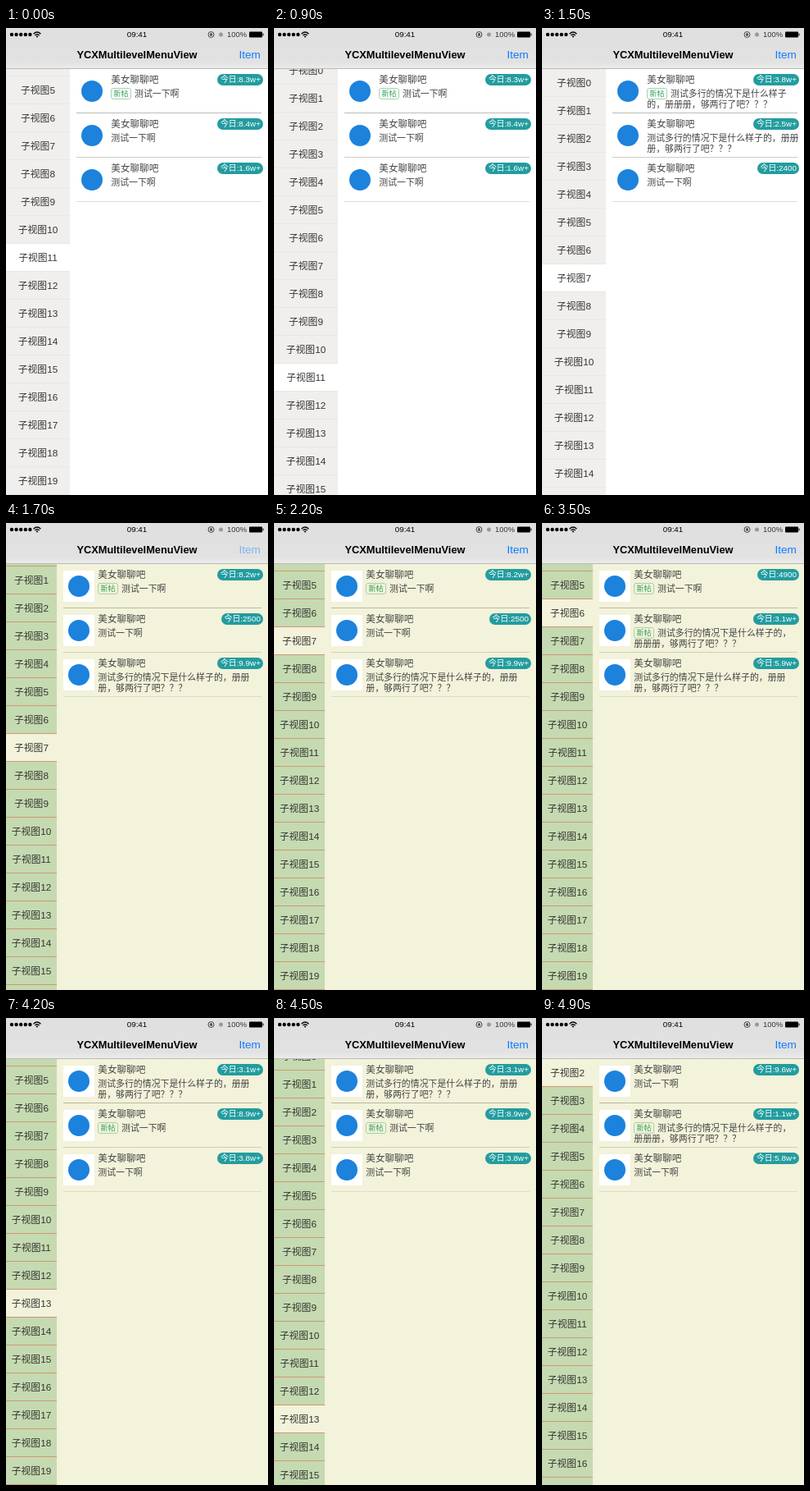
An HTML page for the animation above (5 s loop, 320 by 569 pixels).

```html
<!DOCTYPE html>
<html lang="zh-CN">
<head>
<meta charset="utf-8">
<title>YCXMultilevelMenuView</title>
<style>
html, body { margin: 0; width: 100%; height: 100%; overflow: hidden; }
body { position: relative; background: var(--page); color: #444; white-space: nowrap;
  font-family: "Liberation Sans", "Noto Sans CJK SC", "Noto Sans CJK", sans-serif;
  --page: #fff; --side: #f0efed; --rule: #e7e6e4; --left: 78px; }
body.green { --page: #f3f2da; --side: #c5dab0; --rule: #cf9878; --left: 62px; }
div, svg { position: absolute; }

#menu { left: 0; top: 50px; width: var(--left); }
#menu div { left: 0; width: 100%; height: 34px; box-sizing: border-box; background: var(--side);
  border-bottom: 1px solid var(--rule); font-size: 11.8px; line-height: 34px; text-align: center; color: #333; }
#menu div.on { background: var(--page); }

#cards { left: var(--left); top: 50px; right: 0; height: 170px; }
.card { left: 0; width: 100%; height: 54px; }
.card hr { position: absolute; left: 8px; right: 8px; top: 53px; height: 1px; margin: 0; border: 0; }
.icon { left: 8px; top: 8px; width: 38px; height: 38px; background: #fff; }
.icon::after { content: ""; position: absolute; left: 5.5px; top: 6px; width: 26px; height: 26px;
  border-radius: 50%; background: #1c82dc; }
.name { left: 50.3px; top: 6px; font-size: 11.6px; line-height: 14px; }
.text { left: 50.3px; top: 24px; font-size: 10.9px; line-height: 13px; }
.tag { left: 50px; top: 23px; width: 23px; height: 12px; border: 1px solid #a3d2ab; border-radius: 3px;
  font-size: 9px; line-height: 12.5px; text-align: center; color: #35a05c; }
.gap { display: inline-block; width: 28.7px; }
.badge { right: 6px; top: 6px; height: 14px; padding: 0 3px 0 3.8px; border-radius: 7px;
  background: #239c9f; color: #fff; font-size: 9.9px; line-height: 14px; }

#nav { left: 0; top: 0; width: 320px; height: 49px; border-bottom: 1px solid #b8b8b4;
  background: linear-gradient(#dfdfdf, #e2e2e2 85%, #ebebeb); color: #000; }
#nav div { line-height: 16px; }
#nav svg { left: 0; top: 0; }
#title { top: 25px; width: 100%; text-align: center; font-weight: bold; font-size: 12.8px; }
#item { left: 284.5px; top: 25px; font-size: 13.6px; color: #0a7aff; }
#clock { top: 0; width: 100%; text-align: center; font-size: 9.8px; }
#charge { left: 270px; top: 0; font-size: 9.4px; color: #333; }
</style>
</head>
<body>
<div id="menu"></div>
<div id="cards"></div>
<div id="nav">
  <svg width="320" height="18">
    <path d="M7 8H30" stroke="#000" stroke-width="4.4" stroke-linecap="round" stroke-dasharray="0 5.6"/>
    <g fill="none" stroke="#000" stroke-width="1.3">
      <path d="M33.6 7.2Q38 2.8 42.4 7.2M35.3 9.1Q38 6.4 40.7 9.1"/>
    </g>
    <path d="M36.6 10.2Q38 9 39.4 10.2L38 11.8Z"/>
    <circle cx="250.5" cy="8" r="3.5" fill="none" stroke="#444"/>
    <path d="M249 7.5h3v2h-3zM249.7 7.5v-1.4h1.6v1.4" fill="#444"/>
    <circle cx="262.5" cy="8" r="2.5" fill="#999"/>
    <rect x="297" y="4.5" width="16" height="7" rx="1"/>
    <rect x="313.5" y="6.5" width="1" height="3"/>
  </svg>
  <div id="clock">09:41</div>
  <div id="charge">100%</div>
  <div id="title">YCXMultilevelMenuView</div>
  <div id="item">Item</div>
</div>
<script>
const LOOP = 5000, STEP = 100, ROW = 34, ROWS = 20;
const $ = id => document.getElementById(id);
const SHORT = '测试一下啊';
const LONG = '测试多行的情况下是什么样子的，册册册，够两行了吧？？？';
const RULES = ['#bbb', '#ccc', '#ddd'], GREEN_RULES = ['#b9b8a4', '#cfceba', '#dddcc8'];

// Card: optional "t" for the tag, "l" for the long text, then the count.
const states = [
  { at: 0, row: 11, cards: ['t 8.3w+', ' 8.4w+', ' 1.6w+'] },
  { at: 1500, row: 7, cards: ['tl 3.8w+', 'l 2.5w+', ' 2400'] },
  { at: 1700, row: 7, green: true, cards: ['t 8.2w+', ' 2500', 'l 9.9w+'] },
  { at: 3000, row: 6, green: true, cards: ['t 4900', 'tl 3.1w+', 'l 5.9w+'] },
  { at: 4000, row: 13, green: true, cards: ['l 3.1w+', 't 8.9w+', ' 3.8w+'] },
  { at: 4700, row: 2, green: true, cards: [' 9.6w+', 'tl 1.1w+', ' 5.8w+'] }
];

const drag = p => 1 - (1 - p) ** 2;
const glide = p => p < .5 ? 2 * p * p : 1 - 2 * (1 - p) ** 2;
// Menu scrolling: start, end, target offset, easing.
const moves = [
  [0, 500, 60, drag], [600, 1200, 0, drag], [1600, 1920, 161, glide],
  [2300, 2800, 20, drag], [2900, 3220, 161, glide], [3500, 3900, 40, drag],
  [3900, 4200, 161, glide], [4200, 4500, 20, drag], [4600, 4900, 68, glide]
];

function offset(t) {
  let y = 161;
  for (const [start, end, to, ease] of moves) {
    if (t <= start) break;
    y += (to - y) * ease(Math.min(1, (t - start) / (end - start)));
  }
  return Math.round(y);
}

function cardHtml(spec, i, green) {
  const [kind, count] = spec.split(' ');
  const tag = kind.includes('t');
  const cut = tag ? (green ? 15 : 13) : 17;
  const text = kind.includes('l') ? LONG.slice(0, cut) + '<br>' + LONG.slice(cut) : SHORT;
  return `<div class="card" style="top:${i * 54}px"><div class="icon"></div>
    <div class="name">美女聊聊吧</div>${tag ? '<div class="tag">新帖</div>' : ''}
    <div class="text">${tag ? '<span class="gap"></span>' : ''}${text}</div>
    <div class="badge">今日:${count}</div>
    <hr style="background:${(green ? GREEN_RULES : RULES)[i]}"></div>`;
}

function show(state) {
  document.body.className = state.green ? 'green' : '';
  rows.forEach((r, i) => r.className = i === state.row ? 'on' : '');
  $('cards').innerHTML = state.cards.map((c, i) => cardHtml(c, i, state.green)).join('');
}

const rows = Array.from({ length: ROWS }, (_, i) => {
  const row = document.createElement('div');
  row.textContent = '子视图' + i;
  row.style.top = i * ROW + 'px';
  return $('menu').appendChild(row);
});

let current;
function draw(now) {
  const t = Math.floor(now % LOOP / STEP) * STEP;
  const state = states.findLast(s => s.at <= t);
  if (state !== current) show(current = state);
  $('menu').style.transform = `translateY(${-offset(t)}px)`;
  $('item').style.opacity = t < 1700 ? 1 : Math.min(1, .45 + (t - 1700) / 800);
}

const began = performance.now();
function tick() {
  draw(performance.now() - began);
  requestAnimationFrame(tick);
}
tick();
</script>
</body>
</html>
```
